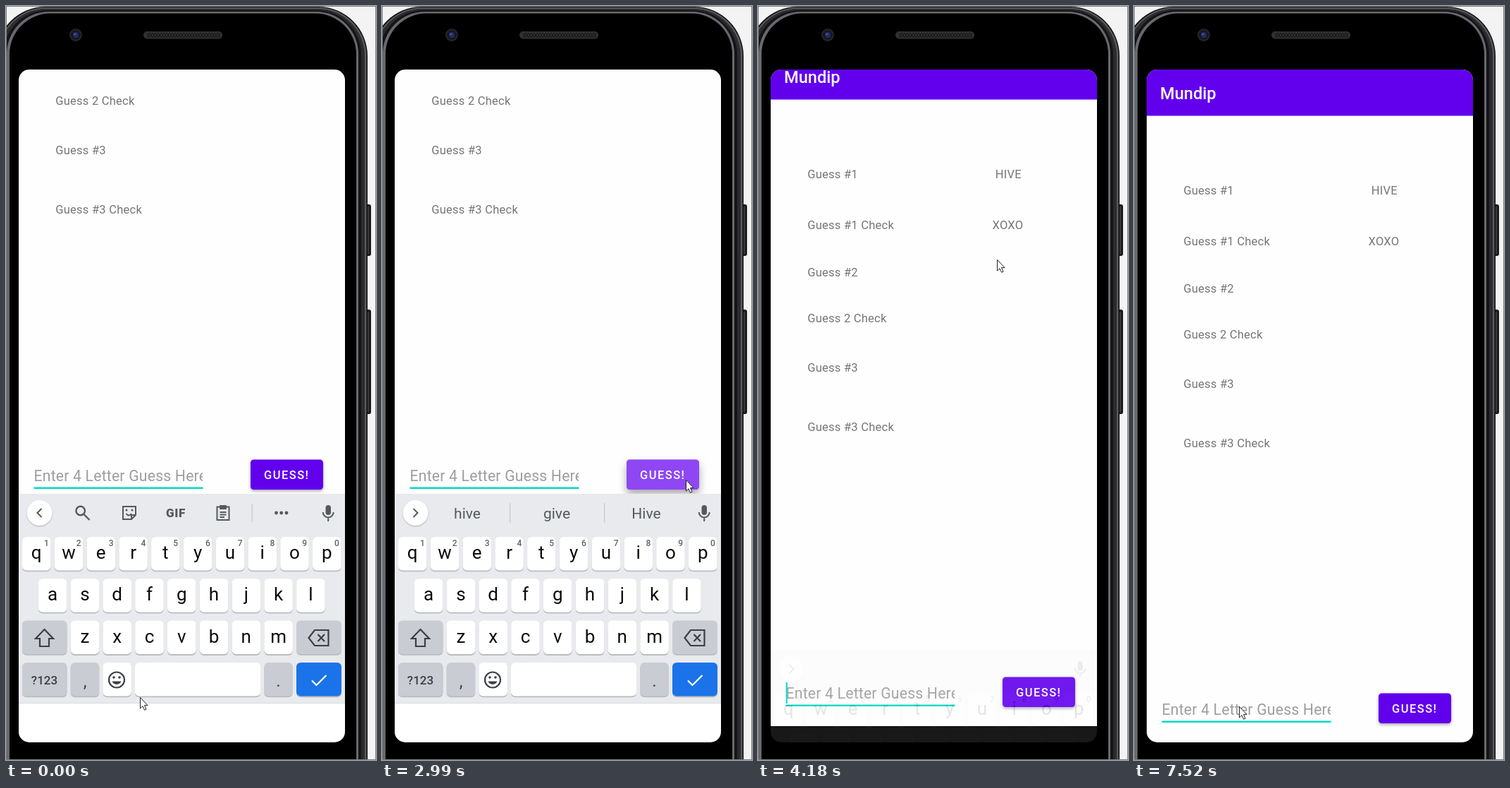
An HTML page with a canvas for the animation above (8000 ms loop, 525x1068 px).

```html
<!DOCTYPE html>
<html lang="en">
<head>
<meta charset="utf-8">
<style>
html, body { margin: 0; width: 100%; height: 100%; overflow: hidden; background: #f3f3f3; }
canvas { display: block; }
</style>
</head>
<body>
<canvas id="stage" width="525" height="1068"></canvas>
<script>
const LOOP = 8000, PURPLE = '#6200ee', TEAL = '#03dac5', ICON = '#55585c';
const stage = document.getElementById('stage').getContext('2d');
const keyLayer = document.createElement('canvas');
keyLayer.width = 525;
keyLayer.height = 1068;
const keyCtx = keyLayer.getContext('2d');
let g = stage;

// Step tracks: each entry is [start time, values...]
const pointerTrack = [
  [0, 190, 979], [1970, 238, 955], [2090, 325, 912], [2210, 396, 876], [2330, 424, 857],
  [2450, 440, 770], [2570, 450, 689], [2720, 431, 671], [3260],
  [4180, 339, 359], [4690, 366, 350], [4810, 387, 343], [4930, 376, 336], [5050, 355, 325],
  [5200, 352, 283], [5350, 350, 264], [5500, 348, 268], [5650, 350, 284], [5770, 358, 303],
  [5890, 367, 324], [6010, 383, 336], [6160, 378, 292], [6310, 375, 266],
  [6450, 361, 498], [6590, 300, 700], [6710, 222, 868], [6840, 165, 970], [6960, 149, 992]
];
const caretTrack = [
  [0, 0], [530, 1], [930, 0], [1210, 1], [2570, 0], [3110, 1], [3630, 0], [4060, 1], [4540, 0],
  [5050, 1], [5500, 0], [6010, 1], [6450, 0], [6960, 1], [7520, 0]
];
const typedTrack = [[0, ''], [1210, 'h'], [1610, 'hi'], [1850, 'hiv'], [2090, 'hive'], [2990, '']];
const barTrack = [
  [0, null], [1330, ['h', 'hi', 'he']], [1610, ['hi', 'his', 'him']], [1850, ['hiv', 'hive', 'his']],
  [2090, ['hive', 'give', 'Hive']], [3110, null], [4060, []]
];
// pan of the app window, drop of the keyboard, keyboard opacity
const panTrack = [[0, 331, 0, 1], [4060, 192, 35, .64], [4180, 23, 221, .1], [4300, 3, 290, 0], [4420, 0, 297, 0]];
const pressTrack = [[0, 0], [2870, .5], [2990, 1], [3110, .6], [3260, 0]];

const at = (track, t) => track.filter(k => k[0] <= t).pop().slice(1);

function box(x, y, w, h, r, fill) {
  g.fillStyle = fill;
  g.beginPath();
  g.roundRect(x, y, w, h, r);
  g.fill();
}

function disc(x, y, r, fill) {
  g.fillStyle = fill;
  g.beginPath();
  g.arc(x, y, r, 0, 7);
  g.fill();
}

function text(s, x, y, size, color, { weight = 400, align = 'left', spacing = 0 } = {}) {
  g.font = `${weight} ${size}px Roboto, sans-serif`;
  g.letterSpacing = spacing + 'px';
  g.textAlign = align;
  g.fillStyle = color;
  g.fillText(s, x, y);
}

function line(path, color = ICON, width = 2, x = 0, y = 0) {
  g.save();
  g.translate(x, y);
  g.strokeStyle = color;
  g.lineWidth = width;
  g.stroke(new Path2D(path));
  g.restore();
}

function shape(path, color, x = 0, y = 0) {
  g.save();
  g.translate(x, y);
  g.fillStyle = color;
  g.fill(new Path2D(path));
  g.restore();
}

function withShadow(blur, dy, alpha, draw) {
  g.save();
  g.shadowColor = `rgba(0,0,0,${alpha})`;
  g.shadowBlur = blur;
  g.shadowOffsetY = dy;
  draw();
  g.restore();
}

function drawPhone() {
  box(0, 0, 525, 1068, 0, '#f3f3f3');
  for (const [y, h] of [[281, 73], [430, 148]]) {
    box(508, y, 10, h, 3, '#1c1c1e');
    box(513, y + 3, 2, h - 6, 1, '#3c3c40');
  }
  const rings = [
    [-14, 1, 513, 70, '#0c0c0d'], [-12, 2, 511.5, 69, '#58595d'], [-10, 4, 509, 67, '#2c2c30'],
    [-4, 6, 504, 63, '#141416'], [1, 8, 500, 60, '#68696e'], [5, 10.5, 497, 58, '#000']
  ];
  for (const [x0, y0, x1, r, fill] of rings) box(x0, y0, x1 - x0, 1200, r, fill);

  disc(99, 41, 9, '#24252a');
  disc(99, 41, 6.5, '#10131f');
  disc(99, 41, 4.5, '#202c58');
  disc(98, 40, 1.5, '#4a5a94');

  box(195, 36, 112, 10.5, 5, '#303031');
  for (let x = 200; x < 303; x += 4) line('M0 9L4 2M0 2L4 9', '#161617', 1, x, 36);
  g.strokeStyle = '#808080';
  g.lineWidth = 1;
  g.strokeRect(.5, .5, 524, 1067);
}

function drawButton(press) {
  withShadow(4 + press * 8, 2 + press * 4, .35, () => box(347, 973.5, 103, 42.5, 4.5, PURPLE));
  if (press) {
    g.save();
    g.beginPath();
    g.roundRect(347, 973.5, 103, 42.5, 4.5);
    g.clip();
    disc(431, 1002, 100 * Math.min(1, press + .1), `rgba(255,255,255,${.28 * press})`);
    g.restore();
  }
  text('GUESS!', 366, 1001, 16.5, '#fff', { weight: 500, spacing: 1.47 });
}

function drawInput(typed, caret) {
  g.save();
  g.beginPath();
  g.rect(39, 970, 240, 50);
  g.clip();
  if (typed) text(typed, 39.5, 1004, 21.2, '#212121', { spacing: .1 });
  else text('Enter 4 Letter Guess Here', 39.5, 1004, 21.2, '#9e9e9e', { spacing: .2 });
  const width = typed ? g.measureText(typed).width : 0;
  if (typed) box(39.5, 1006, width, 1.2, 0, '#212121');
  if (caret) box(39.5 + width, 981, 2.3, 30, 0, TEAL);
  g.restore();
  box(39.5, 1012.5, 240, 2.4, 0, TEAL);
}

function drawApp(t) {
  box(18, 80, 463, 963, 0, '#fefefe');
  box(18, 80, 463, 75.5, 0, PURPLE);
  text('Mundip', 37, 132, 23.6, '#fff', { weight: 500 });
  const label = (s, x, y) => text(s, x, y, 16.5, '#757575', { spacing: .25 });
  label('Guess #1', 70.2, 267);
  label('Guess #1 Check', 70.2, 339);
  label('Guess #2', 70.2, 405.5);
  label('Guess 2 Check', 70.2, 471);
  label('Guess #3', 70.2, 540.5);
  label('Guess #3 Check', 70.2, 624.5);
  if (t >= 2990) {
    label('HIVE', 336.7, 267);
    label('XOXO', 332.5, 339);
  }
  drawInput(at(typedTrack, t)[0], at(caretTrack, t)[0]);
  drawButton(at(pressTrack, t)[0]);
}

function drawToolbar(words) {
  withShadow(2, 1, .25, () => disc(47.5, 718, 18, '#fff'));
  line(words ? 'M-3 -6L3 0L-3 6' : 'M3 -6L-3 0L3 6', ICON, 2, 47.5, 718);

  box(453.5, 707, 7.5, 14, 3.8, ICON);
  line('M-7.5 -1A7.5 7.5 0 0 0 7.5 -1M0 6.5V12', ICON, 2, 457.2, 718);

  if (words) {
    words.forEach((w, i) => text(w, 121 + 127 * i, 726, 21, '#55585c', { align: 'center' }));
    if (words.length) for (const x of [181, 315]) box(x, 704, 1.3, 28, 0, '#c6c9cd');
    return;
  }
  line('M3 -3A6.3 6.3 0 1 0 -9.6 -3A6.3 6.3 0 1 0 3 -3M1.5 2L9.5 10', ICON, 2.4, 109, 718);
  line('M-9 -9H9V3L3 9H-9ZM9 3H3V9M-4.5 1Q-1 6 3 1', ICON, 2, 175, 718);
  disc(171, 714, 1.5, ICON);
  disc(179, 714, 1.5, ICON);
  text('GIF', 241, 724, 17, ICON, { weight: 900, align: 'center', spacing: .7 });
  line('M-8.5 -8.5H8.5V10H-8.5ZM-4.5 -1H4.5M-4.5 2.5H4.5M-4.5 6H2', ICON, 2, 308, 718);
  box(303, 707, 10, 6, 1, ICON);
  box(348.5, 705, 1.3, 26, 0, '#c6c9cd');
  for (const x of [383.5, 390.7, 398]) disc(x, 718, 2.4, ICON);
}

function key(x, y, w, fill = '#fff') {
  box(x, y + 1.3, w, 48, 6, '#b9bcc0');
  box(x, y, w, 47.5, 6, fill);
}

function drawKeyboard(words) {
  const grey = '#c9ccd3', ink = '#3c4043', pitch = 45.78;
  box(18, 691, 463, 352, 0, '#fff');
  box(18, 691, 463, 297, 0, '#e8eaed');
  box(18, 987, 463, 1, 0, '#d9dbde');
  drawToolbar(words);

  [['qwertyuiop', 0], ['asdfghjkl', .5], ['zxcvbnm', 1.5]].forEach(([row, indent], r) => {
    [...row].forEach((ch, i) => {
      const x = 23 + pitch * (i + indent), y = 752 + 59.3 * r;
      key(x, y, 40.5);
      text(ch, x + 20.2, y + 31, 26, '#0b0b0c', { align: 'center' });
      if (!r) text((i + 1) % 10, x + 34.5, y + 12.5, 12, '#5f6368', { weight: 500, align: 'center' });
    });
  });

  key(23, 870.5, 63.5, grey);
  line('M0 -12L12.5 1H6.5V12H-6.5V1H-12.5Z', ink, 2.2, 54.5, 895);
  key(412, 870.5, 64, grey);
  line('M-6 -11H13.5V11H-6L-14.5 0ZM-1.5 -5L8 5M8 -5L-1.5 5', ink, 2.2, 444, 895);

  key(23, 930, 63.5, grey);
  text('?123', 54.5, 961, 17, ink, { weight: 500, align: 'center' });
  key(91.7, 930, 40.5, grey);
  text(',', 112, 965, 24, ink, { align: 'center' });
  key(137.4, 930, 40.5);
  line('M11 0A11 11 0 1 0 -11 0A11 11 0 1 0 11 0', ink, 2.2, 157, 954.5);
  disc(153, 951, 1.8, ink);
  disc(161, 951, 1.8, ink);
  shape('M-6.5 2H6.5A7 7 0 0 1 -6.5 2Z', ink, 157, 954.5);
  key(183, 930, 178);
  key(366.3, 930, 40.5, grey);
  text('.', 386.5, 964, 24, ink, { align: 'center' });
  key(412, 930, 64, '#1a73e8');
  line('M-10 0L-3.5 6.5L10.5 -7.5', '#fff', 2.2, 444, 955.5);
}

function drawPointer(x, y) {
  const arrow = 'M.5 .5V16L4 12.7L6.6 18.3L9 17.2L6.5 11.6H11Z';
  shape(arrow, '#fff', x, y);
  line(arrow, '#222', 1, x, y);
}

function render(t) {
  const [pan, drop, alpha] = at(panTrack, t);
  drawPhone();
  g.save();
  g.beginPath();
  g.roundRect(18, 90, 463, 953, 15);
  g.clip();
  box(18, 90, 463, 953, 0, '#000');
  g.save();
  g.translate(0, -pan);
  drawApp(t);
  g.restore();
  if (alpha) {
    g = keyCtx;
    drawKeyboard(at(barTrack, t)[0]);
    g = stage;
    g.globalAlpha = alpha;
    g.drawImage(keyLayer, 0, drop);
    // The nav strip stays covered while the keyboard slides down
  }
  g.restore();
  const [x, y] = at(pointerTrack, t);
  if (x !== undefined) drawPointer(x, y);
}

const start = performance.now();
function tick() {
  render((performance.now() - start) % LOOP);
  requestAnimationFrame(tick);
}
tick();
</script>
</body>
</html>
```
